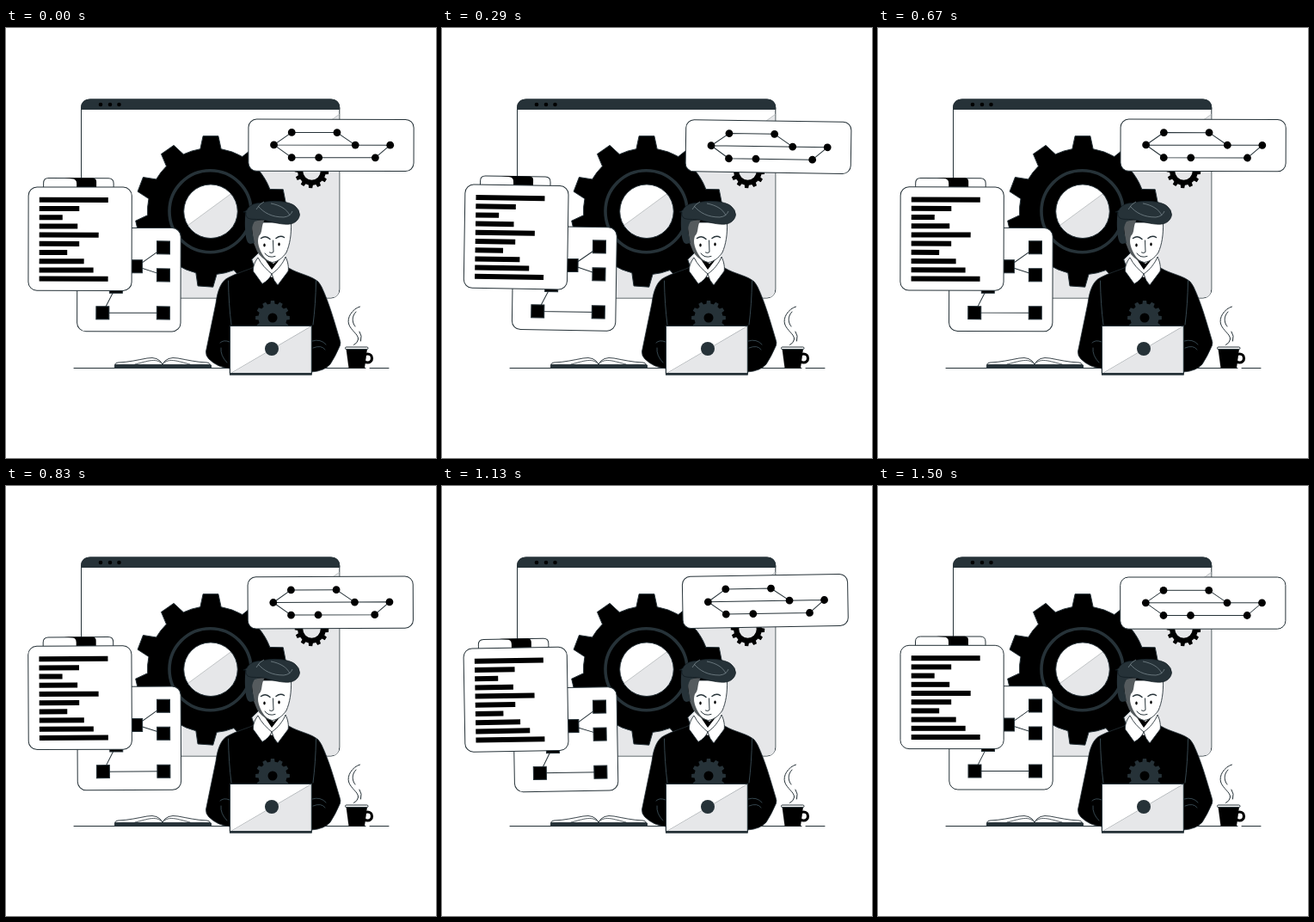
These frames come from a looping animation (500x500 px, 1540 ms). An HTML page:

```html
<!DOCTYPE html>
<html lang="en">
<head>
<meta charset="utf-8">
<title>Working on a process</title>
<style>
  html, body { margin: 0; width: 100%; height: 100%; overflow: hidden; background: #fff; }
  svg { display: block; width: 100%; height: 100%; }
  .card { fill: #fff; stroke: #263238; }
  .line { fill: none; stroke: #263238; stroke-linecap: round; stroke-linejoin: round; }
  .dark { fill: #263238; }
  .grey { fill: #e6e7e9; }
  .fold { fill: none; stroke: #455a64; stroke-width: .8; stroke-linecap: round; }
</style>
</head>
<body>
<svg viewBox="0 0 500 500">
  <!-- browser window -->
  <rect class="card" x="87.500" y="83" width="300.300" height="231" rx="10"/>
  <path class="grey" d="M387.300 100V304Q387.300 313.500 378 313.500H97Z"/>
  <path d="M388 100L97 313.500" stroke="#a6abae" stroke-width=".6"/>
  <path class="dark" d="M87.500 94.500V93Q87.500 83 97.500 83H377.800Q387.800 83 387.800 93V94.500Z" stroke="#263238"/>
  <g id="dots"></g>
  <path id="bigGear" fill-rule="evenodd" stroke="#263238"/>
  <circle cx="237.500" cy="213.200" r="47.500" fill="none" stroke="#263238" stroke-width="3.600"/>
  <path id="smallGear" fill-rule="evenodd"/>

  <!-- desk -->
  <path class="line" d="M79 395.500H418M423 395.500H445"/>

  <!-- book -->
  <path class="card" stroke-width=".9" d="M126.500 391.500Q127 389.500 130 389C143 388.500 153 386 164 384Q177 381.500 182 391Q187 381.500 200 384C211 386 221 388.500 234 389Q237 389.500 237.500 391.500Z"/>
  <path class="line" stroke-width=".8" d="M150 391C160 389 175 382 182 391C189 382 204 389 214 391"/>
  <rect class="dark" x="126" y="391.500" width="113" height="4" rx="1"/>

  <!-- cup -->
  <circle cx="420.500" cy="384" r="5" fill="none" stroke="#000" stroke-width="3.200"/>
  <path d="M395.500 373H420L417 395.500H398.500Z"/>
  <rect class="card" x="394.500" y="371" width="26.500" height="2.600" rx="1.300"/>
  <path class="line" d="M411.500 324C402 327 396.500 337 398.500 344C401 352 410 356 409.500 362Q409 366 404.500 368.500M407 330C402 335 402 342 406 347M411 353Q414.500 358 412.500 364"/>

  <!-- body -->
  <path stroke="#263238" stroke-width=".8" d="M291 277C280 282 268 285 259 290C250 294 246 305 244 320L232.500 376Q232 381 236 385Q246 395 261 396V400H355Q370 399 377 391Q383 382 388.500 369Q389.500 366 388 362C382 342 376 320 367 301Q364 294 357 291C347 286 335 284 326 277Z"/>
  <path class="fold" d="M258.500 294Q259 322 262 345M360.500 294Q360 322 357 345M249 366Q253 362 260 365M250 372Q249 381 257 389M356 364Q366 361 372 368M357 372Q367 368 371 374"/>
  <path id="shirtGear" class="dark" fill-rule="evenodd"/>

  <!-- neck and collar -->
  <path fill="#fff" d="M293 264H325L324 278L309 290L295 280Z"/>
  <path d="M299 266L309 281L319 268L311 274Z"/>
  <path class="card" stroke-width=".9" d="M293 267C289 272 287 278 287.500 283L298 297.500Q306 293 309 286C303 281 297 275 293 267ZM325 266C328 272 329 279 328 283L316 299Q311 294 309 286C316 281 322 274 325 266Z"/>

  <!-- head -->
  <path fill="#fff" stroke="#263238" stroke-width=".9" d="M290 226H331.500C332 240 330 252 326 261C322 267 316 272 309.500 272.500C301 271 294 262 291 252Z"/>
  <path fill="#555b5e" d="M285 224L301 223C296 230 299 237 294 242C291.500 249 294 257 300 266L306 272.500Q297 268 292 260L288 250Z"/>
  <path class="dark" d="M279 212C277 225 278 236 279 243Q280 250 284 251L289 250L286.500 238Q285 231 289 225L300 222Z"/>
  <path class="dark" stroke="#111b20" stroke-width=".7" d="M276 214Q280 213 281 210C286 203 293 204 298 203C309 200 329 201 336 207Q341 211 341.500 217C341 222 337 227 330 228C321 229 311 226 303 224C294 221 288 224 281 221Q278 218 279 214Z"/>
  <path fill="none" stroke="#78868c" stroke-width=".8" d="M293 207C300 215 309 220 323 220Q331 219 333 213M308 204C319 206 327 211 330 218M291 211Q295 204 300 202"/>
  <path class="line" stroke="#000" stroke-width="1.500" d="M296.500 244.500Q302 240.500 307 245.500M314 244.500Q319 240.500 323.500 243.500"/>
  <path class="line" d="M310.500 247L311 260.500Q309 262.500 306.500 261M301 262Q305 268 313 265.500"/>
  <ellipse cx="300.500" cy="252.500" rx="1.200" ry="2"/>
  <ellipse cx="317.500" cy="251.500" rx="1.200" ry="2"/>

  <!-- laptop -->
  <rect class="card" x="260.400" y="346.400" width="94.900" height="55.600"/>
  <path class="grey" d="M354.800 347V402H262Z"/>
  <path d="M260.500 402L355.300 346.500" stroke="#9aa0a4" stroke-width=".7"/>
  <path class="line" d="M260.400 402V346.400H355.300V402"/>
  <rect class="dark" x="260" y="401" width="95.700" height="2.800"/>
  <circle class="dark" cx="309" cy="373" r="8"/>

  <!-- swaying cards -->
  <g id="cards">
    <rect class="card" x="82.800" y="232.700" width="120.400" height="120.300" rx="10"/>
    <path class="line" d="M183 255.500L152 277.500L183 287.500M128 301L112.500 331.500H183"/>
    <g id="boxes"></g>
    <path class="card" d="M43.500 186V181Q43.500 175 49.500 175H119Q125 175 125 181V186Z"/>
    <path d="M68 174.700H101Q105 175 105 179V186H82V181Q82 175.500 76 175.500Z"/>
    <rect class="card" x="26" y="185.300" width="120.200" height="120.300" rx="10"/>
    <g id="bars"></g>
    <rect class="card" x="281.700" y="106" width="192.200" height="60.200" rx="9.500"/>
    <path class="line" d="M446.500 135.800H311.300L332 121.300H384.700L406 135.800M311.300 135.800L332 150.500H429.200L446.500 135.800"/>
    <g id="nodes"></g>
  </g>
</svg>
<script>
const $ = id => document.getElementById(id);

function add(parent, tag, attrs) {
  const el = document.createElementNS('http://www.w3.org/2000/svg', tag);
  for (const key in attrs) el.setAttribute(key, attrs[key]);
  $(parent).append(el);
}

// angles: tooth directions in degrees from the top; base and tip are half widths in degrees
function gear(id, cx, cy, r, R, hole, angles, base, tip) {
  const at = (deg, radius) => {
    const a = deg * Math.PI / 180;
    return (cx + radius * Math.sin(a)).toFixed(2) + ' ' + (cy - radius * Math.cos(a)).toFixed(2);
  };
  const teeth = angles.map((a, i) =>
    `${i ? `A${r} ${r} 0 0 1 ` : 'M'}${at(a - base, r)}L${at(a - tip, R)}L${at(a + tip, R)}L${at(a + base, r)}`);
  const close = `A${r} ${r} 0 0 1 ${at(angles[0] - base, r)}Z`;
  const ring = `M${cx - hole} ${cy}a${hole} ${hole} 0 1 0 ${2 * hole} 0a${hole} ${hole} 0 1 0 ${-2 * hole} 0Z`;
  $(id).setAttribute('d', teeth.join('') + close + ring);
}

const even = (n, from = 0) => Array.from({ length: n }, (_, i) => from + i * 360 / n);

gear('bigGear', 238, 213.2, 73.5, 88, 31.3, [0, 39.5, 79, 114, 149, 184, 222, 257, 291, 325], 9.5, 5.8);
gear('smallGear', 355.5, 166.5, 16.3, 19.8, 10.2, even(12, 4), 9, 6);
gear('shirtGear', 310, 337, 16.5, 20, 5.5, even(12), 9, 6);

for (const cx of [110, 121, 131.5]) add('dots', 'circle', { cx, cy: 89, r: 2.3 });

for (const [x, y] of [[183, 255.5], [183, 287.5], [151, 277.5], [128, 301], [112.5, 331.5], [183, 331.5]])
  add('boxes', 'rect', { x: x - 7.5, y: y - 7.5, width: 15, height: 15, stroke: '#263238' });

[80, 46.5, 27, 44.5, 69, 46.5, 32.5, 52, 63, 80].forEach((width, i) =>
  add('bars', 'rect', { x: 38.7, y: 197.2 + i * 10.2, width, height: 6 }));

for (const [cx, cy] of [[311.3, 135.8], [332, 121.3], [384.7, 121.3], [406, 135.8], [446.5, 135.8], [332, 150.5], [363.5, 150.5], [429.2, 150.5]])
  add('nodes', 'circle', { cx, cy, r: 4.4 });

const LOOP = 1540, STEPS = 37, STEP = 1000 / 24;

// 0 → 1° → -1° → 0, linear, held for one step at 24 per second
function sway(ms) {
  const t = Math.floor((ms % LOOP) / 10) * 10;
  const step = Math.floor((t + 4.9) / STEP);
  const p = (step + 1) % STEPS / STEPS;
  return p < .25 ? 4 * p : p < .75 ? 2 - 4 * p : 4 * p - 4;
}

const start = performance.now();
function draw() {
  const ms = Math.max(0, performance.now() - start);
  $('cards').setAttribute('transform', `rotate(${sway(ms).toFixed(4)} 250 250)`);
  requestAnimationFrame(draw);
}
draw();
</script>
</body>
</html>
```
